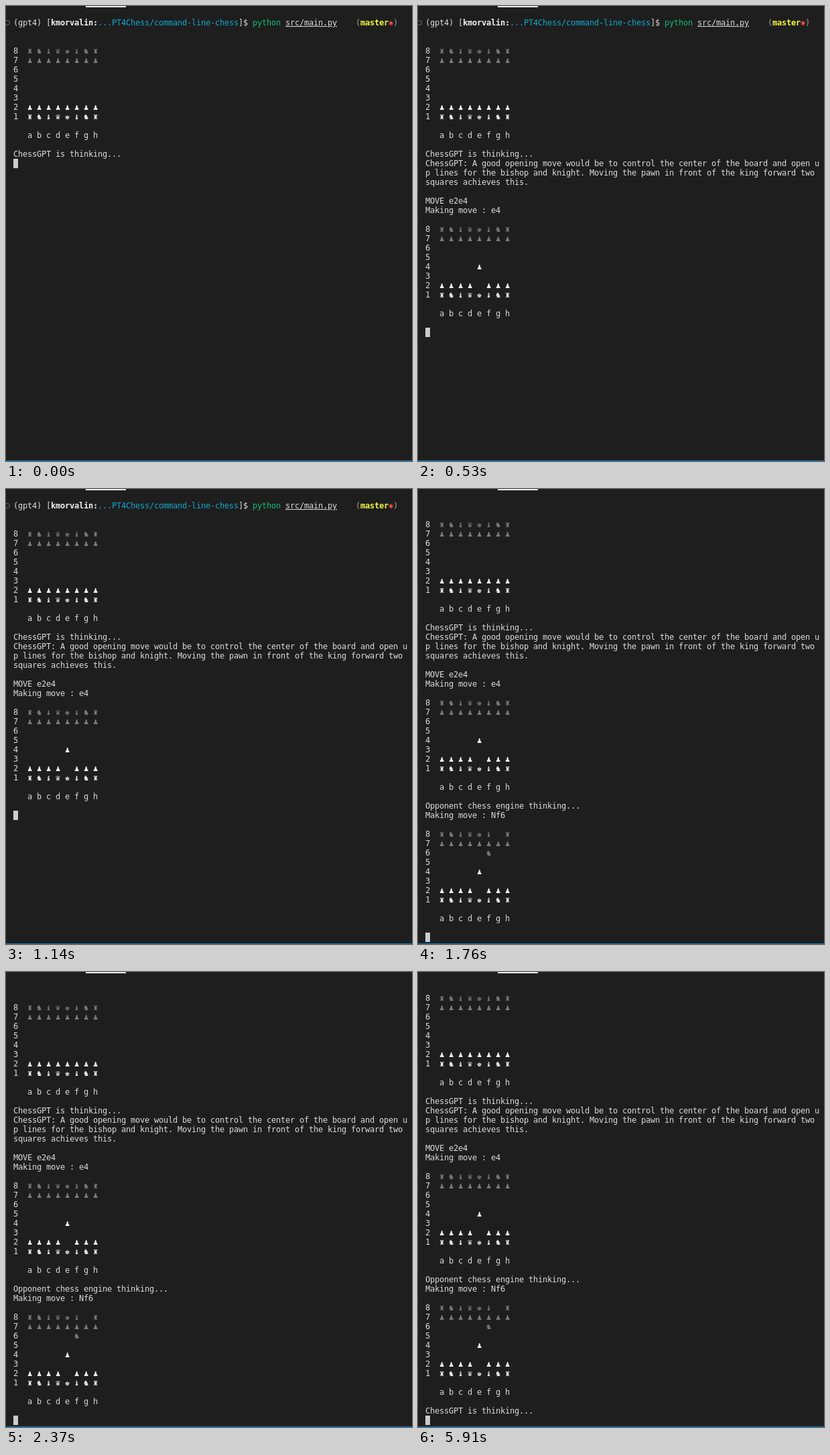
Recreate the animation shown at these times as an HTML page. Size 606x679 px, loop 8000 ms.

```html
<!DOCTYPE html>
<html lang="en">
<head>
<meta charset="utf-8">
<title>Command line chess</title>
<style>
  html, body { margin: 0; width: 100%; height: 100%; overflow: hidden; background: #1e1e1e; }
  #stage { position: relative; width: 606px; height: 679px; overflow: hidden; }
  #tab, #status { position: absolute; height: 1px; }
  #tab { left: 119px; top: 0; width: 60px; height: 1.5px; background: #e7e7e7; }
  #status { left: 0; bottom: 0; width: 100%; background: #007acc; }
  #screen {
    position: absolute; left: 11px; top: 18px; margin: 0;
    font: 12px/14px "DejaVu Sans Mono", monospace;
    letter-spacing: calc(7px - 1ch); /* terminal cells are 7px wide */
    font-variant-ligatures: none;
    color: #dcdcdc;
  }
  #screen b { color: #f0f0f0; }
  #screen .path { color: #11a8cd; }
  #screen .cmd { color: #0dbc79; }
  #screen .paren { color: #a0a0a0; }
  #screen .branch { color: #f5f543; }
  #screen .dirty { color: #f14c4c; }
  #screen .white { color: #f2f2f2; }
  #screen .black { color: #7c7c7c; }
  .ring {
    position: absolute; left: -13px; top: 3px; width: 6px; height: 6px;
    border: 1px solid #6e6e6e; border-radius: 50%;
  }
  .cursor { display: inline-block; width: 7px; height: 14px; background: #ccc; vertical-align: top; }
</style>
</head>
<body>
<div id="stage">
  <div id="tab"></div>
  <pre id="screen"></pre>
  <div id="status"></div>
</div>
<script>
const LOOP = 8000, ROWS = 47;
const GLYPHS = { k: "♚", q: "♛", r: "♜", b: "♝", n: "♞", p: "♟" };

const span = (cls, text) => `<span class="${cls}">${text}</span>`;

function square(piece) {
  const kind = piece.toLowerCase();
  return GLYPHS[kind] ? span(piece === kind ? "black" : "white", GLYPHS[kind]) : " ";
}

// Prints a position written in FEN piece placement notation.
function board(fen) {
  const ranks = fen.split("/").map((rank, i) => {
    const squares = rank.replace(/\d/g, n => " ".repeat(n));
    return `${8 - i}  ${[...squares].map(square).join(" ")}\n`;
  });
  return ranks.join("") + "\n   a b c d e f g h\n\n";
}

const prompt = '<i class="ring"></i>(gpt4) [<b>kmorvalin:</b>' +
  span("path", "...PT4Chess/command-line-chess") + "]$ " +
  span("cmd", "python") + " <u>src/main.py</u>    " +
  span("paren", "(") + '<b class="branch">master</b>' +
  span("dirty", "✱") + span("paren", ")") + "\n\n\n";

const output = [
  [0, prompt + board("rnbqkbnr/pppppppp/8/8/8/8/PPPPPPPP/RNBQKBNR") + "ChessGPT is thinking...\n"],
  [500, "ChessGPT: A good opening move would be to control the center of the board and open u\n" +
        "p lines for the bishop and knight. Moving the pawn in front of the king forward two \n" +
        "squares achieves this.\n\nMOVE e2e4\n"],
  [530, "Making move : e4\n\n" + board("rnbqkbnr/pppppppp/8/8/4P3/8/PPPP1PPP/RNBQKBNR")],
  [1550, "Opponent chess engine thinking...\n"],
  [1760, "Making move : Nf6\n\n" + board("rnbqkb1r/pppppppp/5n2/8/4P3/8/PPPP1PPP/RNBQKBNR")],
  [2780, "ChessGPT is thinking...\n"],
];

const screenEl = document.getElementById("screen");
let shown = 0;

function render(time) {
  const printed = output.filter(([at]) => at <= time);
  if (printed.length !== shown) {
    shown = printed.length;
    const text = printed.map(([, chunk]) => chunk).join("") + '<i class="cursor"></i>';
    screenEl.innerHTML = text.split("\n").slice(-ROWS).join("\n");
  }
}

const start = performance.now();
function tick() {
  render((performance.now() - start) % LOOP);
  requestAnimationFrame(tick);
}
tick();
</script>
</body>
</html>
```
